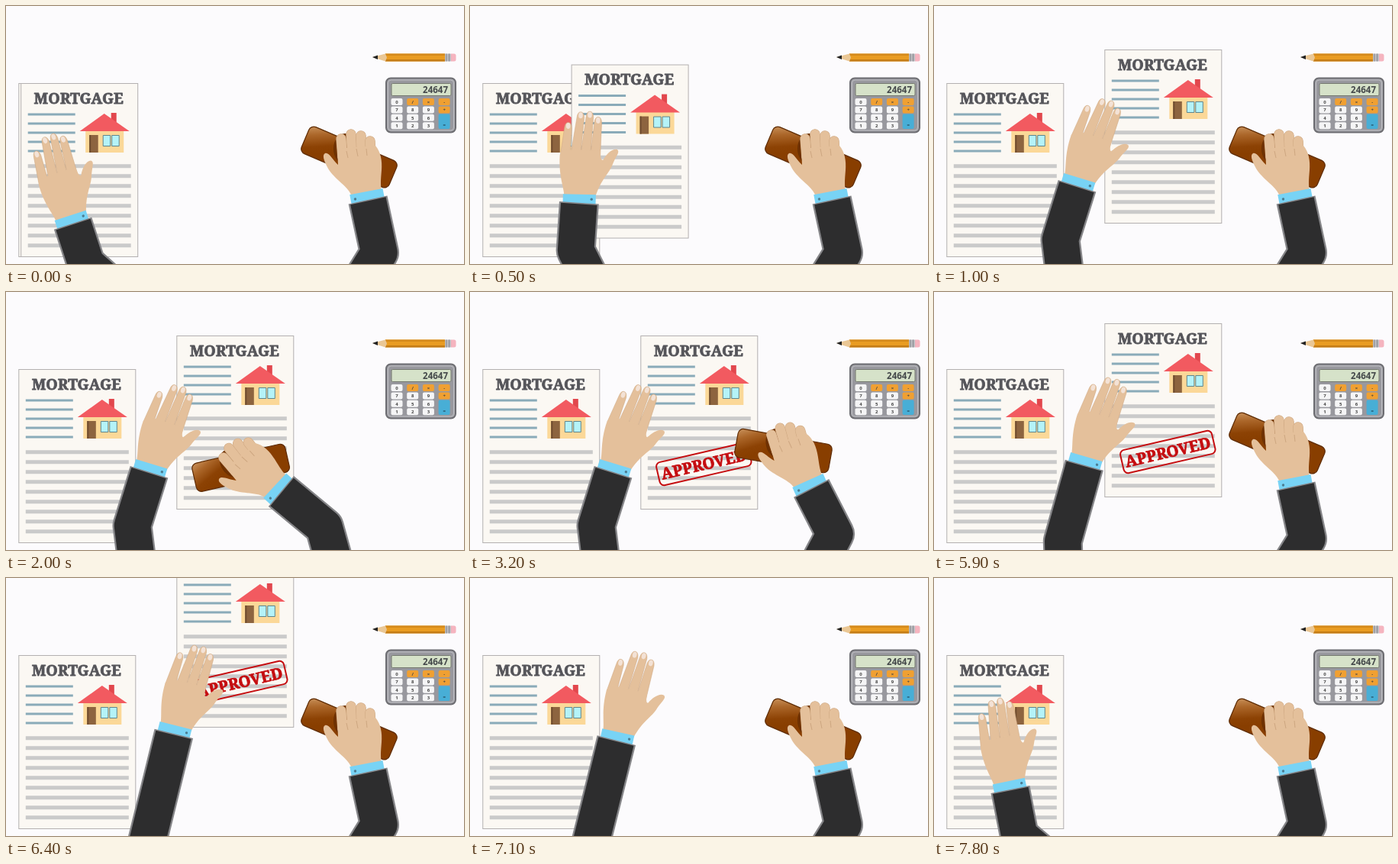
An HTML page for the animation above (7.9 s loop, 600 px wide and 338 px high).

```html
<!DOCTYPE html>
<html lang="en">
<head>
<meta charset="utf-8">
<title>Mortgage approval</title>
<style>
  html, body { margin: 0; width: 100%; height: 100%; overflow: hidden; background: #fcfbfd; }
  svg { display: block; width: 100vw; height: 100vh; }
  .title { font: bold 19.6px "Noto Serif", serif; text-anchor: middle; stroke-width: .8; stroke-linejoin: round; }
  .mark { font-size: 20.4px; }
  .key { font: bold 6px "Noto Sans", sans-serif; text-anchor: middle; }
  .sum { font: 600 11.5px "Noto Sans", sans-serif; text-anchor: end; }
  .sleeve { fill: none; stroke-linejoin: round; }
</style>
</head>
<body>
<svg viewBox="0 0 600 338">
  <defs>
    <linearGradient id="wood" x1="0" y1="0" x2=".5" y2="0.3">
      <stop offset="0" stop-color="#cb955f"/>
      <stop offset=".35" stop-color="#ab6629"/>
      <stop offset=".75" stop-color="#8c4204"/>
      <stop offset="1" stop-color="#883e00"/>
    </linearGradient>
    <radialGradient id="knob">
      <stop offset="0" stop-color="#8a4206"/>
      <stop offset="1" stop-color="#6b2f00"/>
    </radialGradient>
    <g id="page">
      <rect x=".5" y=".5" width="153" height="227" fill="#fbf8f3" stroke="#b3b0b0"/>
      <text class="title" x="76" y="26.5" fill="#55555a" stroke="#55555a">MORTGAGE</text>
      <path id="blueLines" stroke="#8aabb9" stroke-width="3"/>
      <path id="grayLines" stroke="#cacaca" stroke-width="5"/>
      <path d="M85 59H135V91H85Z" fill="#fbd898"/>
      <path d="M118.500 39H125.500V56H118.500Z" fill="#e2474d"/>
      <path d="M77.500 63L109.500 40L142.500 63Z" fill="#f25a60"/>
      <path d="M90 68H101.500V91H90Z" fill="#8d643f"/>
      <path d="M90 68H92V91H90Z" fill="#6f4c2e"/>
      <path d="M108 68.500H117.500V82.500H108ZM119.500 68.500H129V82.500H119.500Z" fill="#b4f3f8" stroke="#5f858d"/>
    </g>
  </defs>

  <use href="#page" x="16.300" y="101"/>

  <g id="contract">
    <use href="#page"/>
    <g id="mark" transform="translate(83 168.500) rotate(-13)">
      <rect x="-61.500" y="-15.500" width="123" height="31" rx="6" fill="none" stroke="#c50d10" stroke-width="2"/>
      <text class="title mark" y="7.500" fill="#c50d10" stroke="#c50d10">APPROVED</text>
    </g>
  </g>

  <g id="leftHand">
    <g id="fingers"></g>
    <path fill="#e4c09b" d="M-20 -3C-20 -14 -28 -28 -27 -56L-24 -64L26 -64C26 -58 27 -50 30 -52C34 -60 42 -68 48 -66C52 -63 47 -58 43 -48C39 -35 27 -26 21 -3Z"/>
    <rect x="-21.500" y="-6" width="43" height="14" fill="#78d3f5"/>
    <circle cx="16" cy="0" r="1.700" fill="#4d7d92"/>
  </g>
  <g id="leftArm"></g>

  <g id="tools">
    <path d="M497 62.500H575V72.500H497Z" fill="#e99c22"/>
    <path d="M497 62.500H575V65H497Z" fill="#d58a1c"/>
    <path d="M497 70H575V72.500H497Z" fill="#c57d17"/>
    <path d="M480 67L497 62.500L499 67.500L497 72.500Z" fill="#eac795"/>
    <path d="M480 67L487 64.500V70Z" fill="#222"/>
    <path d="M575 62.500H583V72.500H575Z" fill="#bcbcc0"/>
    <path d="M577 62.500V72.500M580.500 62.500V72.500" stroke="#85858a"/>
    <path d="M583 62.500H587Q589.500 62.500 589.500 65V70Q589.500 72.500 587 72.500H583Z" fill="#f5b4bf"/>
    <rect x="498" y="94.500" width="91" height="71" rx="6" fill="#a2a2a7" stroke="#6d6d72" stroke-width="2"/>
    <rect x="500.500" y="97" width="86" height="66" rx="4" fill="#98989e" stroke="#bdbdc2"/>
    <rect x="505" y="101.500" width="78" height="16" rx="1.500" fill="#d6e2c9" stroke="#74786f"/>
    <text class="sum" x="579" y="113.500" fill="#44484a">24647</text>
    <g id="keys"></g>
  </g>

  <g id="rightHand">
    <g transform="translate(449.500 198) rotate(23.200)">
      <rect x="-62.500" y="-19" width="125" height="38" rx="7" fill="url(#wood)" stroke="#5d2a02" stroke-width="1.200"/>
    </g>
    <ellipse cx="444" cy="187" rx="15" ry="20" fill="url(#knob)"/>
    <g id="grip" fill="none" stroke-linecap="round"></g>
    <path fill="#e4c09b" d="M453 250C450 237 430 227 422 213C416 202 414 195 418 193C423 191 428 202 435 208L434 187L484 183C491 191 493 203 492 215C491 228 490 236 493 246Z"/>
    <path d="M446 190L448 199M459 187L461 197M472 187L473 196" stroke="#cda680" fill="none"/>
    <g transform="translate(473 249) rotate(-11)">
      <rect x="-22" y="-6" width="44" height="14" fill="#78d3f5"/>
      <circle cx="-16" cy="1" r="1.700" fill="#4d7d92"/>
    </g>
  </g>
  <g id="rightArm"></g>
</svg>

<script>
const LOOP = 7900, STEP = 100;
const SKIN = "#e4c09b", CREASE = "#cda680";
const $ = id => document.getElementById(id);

function add(parent, tag, attrs, text) {
  const el = document.createElementNS("http://www.w3.org/2000/svg", tag);
  for (const k in attrs) el.setAttribute(k, attrs[k]);
  if (text) el.textContent = text;
  parent.append(el);
  return el;
}

function rows(count, y, gap, x1, x2) {
  return Array.from({ length: count }, (_, i) => `M${x1} ${y + i * gap}H${x2}`).join("");
}
$("blueLines").setAttribute("d", rows(5, 41, 12, 9.5, 71.5));
$("grayLines").setAttribute("d", rows(9, 108.8, 13, 9.5, 144.5));

// Stretched fingers narrow towards the nail
for (const [x, tx, ty] of [[-20, -17, -100], [-6.5, -1, -114], [6.5, 11, -115], [19.5, 22, -108]]) {
  const d = `M${x - 6.5} -56L${tx - 4.8} ${ty + 7}Q${tx - 4} ${ty} ${tx} ${ty}Q${tx + 4} ${ty} ${tx + 4.8} ${ty + 7}L${x + 6.5} -56Z`;
  add($("fingers"), "path", { d, fill: SKIN, stroke: CREASE, "stroke-width": .5 });
  add($("fingers"), "ellipse", { cx: tx, cy: ty + 4.5, rx: 2.8, ry: 4, fill: "#f3e2d6" });
}
for (const [x1, x2, y2] of [[441, 439, 174], [454, 452, 168], [466, 465, 170], [478, 477, 177]]) {
  const d = `M${x1} 198L${x2} ${y2}`;
  add($("grip"), "path", { d, stroke: CREASE, "stroke-width": 13.5 });
  add($("grip"), "path", { d, stroke: SKIN, "stroke-width": 12.5 });
}

// Calculator keys, row by row
["0/×-", "789+", "456", "123"].forEach((row, r) => [...row].forEach((label, c) => {
  const x = 512 + c * 20.7, y = 125.5 + r * 10.4;
  const orange = c === 3 || (r === 0 && c > 0);
  add($("keys"), "rect", { x: x - 7.5, y: y - 4.5, width: 15, height: 9, rx: 2, fill: orange ? "#f0a032" : "#f5f5f6" });
  add($("keys"), "text", { class: "key", x, y: y + 2.2, fill: "#444" }, label);
}));
add($("keys"), "rect", { x: 566.6, y: 141.5, width: 15, height: 19.5, rx: 2, fill: "#48aed6" });
add($("keys"), "text", { class: "key", x: 574.1, y: 158, fill: "#245" }, "=");

function sleeve(id) {
  return [["#858588", 52], ["#2d2d2e", 47.5]].map(([stroke, w]) =>
    add($(id), "path", { class: "sleeve", stroke, "stroke-width": w }));
}
const leftSleeve = sleeve("leftArm"), rightSleeve = sleeve("rightArm");

function drawSleeve(parts, wx, wy, ex, ey, sx, sy) {
  const len = Math.hypot(ex - wx, ey - wy), ux = (ex - wx) / len, uy = (ey - wy) / len;
  parts.forEach((p, i) => {
    const gap = 5 + i * 1.5;
    p.setAttribute("d", `M${wx + ux * gap} ${wy + uy * gap}L${ex} ${ey}L${sx} ${sy}`);
  });
}

// Linear track; each key is [time, ...values]
function at(track, t) {
  let i = 0;
  while (i < track.length - 2 && t >= track[i + 1][0]) i++;
  const [a, b] = [track[i], track[i + 1]];
  const k = Math.min(1, Math.max(0, (t - a[0]) / (b[0] - a[0])));
  return a.slice(1).map((v, n) => v + (b[n + 1] - v) * k);
}

const page = [
  [0, 19.2, 101], [900, 223.3, 57], [5700, 223.3, 57],
  [6100, 223.3, 25], [6400, 223.3, -32], [7000, 223.3, -235], [LOOP, 223.3, -235]
];

// Poses: x, y, turn, elbow x, y, shoulder x, y
const reach = [86, 280, -18, 105, 338, 150, 378];
const hold = [189, 231, 17, 165.5, 306, 172, 358];
const left = [
  [0, ...reach], [900, ...hold], [5700, ...hold],
  [6400, 221, 199, 14, 177, 378, 166, 421],
  [6800, 232, 165, 14, 190, 335, 172, 430],
  [7200, 180, 222, 12, 148, 350, 155, 420],
  [7800, 99, 272, -12, 112, 338, 156, 375],
  [LOOP, ...reach]
];
const rest = [450, 198, 0, 489, 323, 466, 360];
const press = [308, 230, -36, 417, 308, 432, 362];
const right = [
  [0, ...rest], [1200, ...rest], [1900, ...press], [2700, ...press],
  [3200, 411, 208, -13, 478, 317, 458, 355], [3400, ...rest], [LOOP, ...rest]
];

function draw(t) {
  const [px, py] = at(page, t);
  $("contract").setAttribute("transform", `translate(${px} ${py})`);
  $("mark").setAttribute("visibility", t >= 2300 ? "visible" : "hidden");

  const [lx, ly, lr, ...leftJoints] = at(left, t);
  $("leftHand").setAttribute("transform", `translate(${lx} ${ly}) rotate(${lr})`);
  drawSleeve(leftSleeve, lx, ly, ...leftJoints);

  const [rx, ry, rr, ...rightJoints] = at(right, t);
  $("rightHand").setAttribute("transform", `translate(${rx} ${ry}) rotate(${rr}) translate(-450 -198)`);
  const a = rr * Math.PI / 180, c = Math.cos(a), s = Math.sin(a);
  drawSleeve(rightSleeve, rx + 23 * c - 51 * s, ry + 23 * s + 51 * c, ...rightJoints);
}

const start = performance.now();
function tick() {
  const t = (performance.now() - start) % LOOP;
  draw(Math.floor(t / STEP) * STEP);
  requestAnimationFrame(tick);
}
tick();
</script>
</body>
</html>
```
